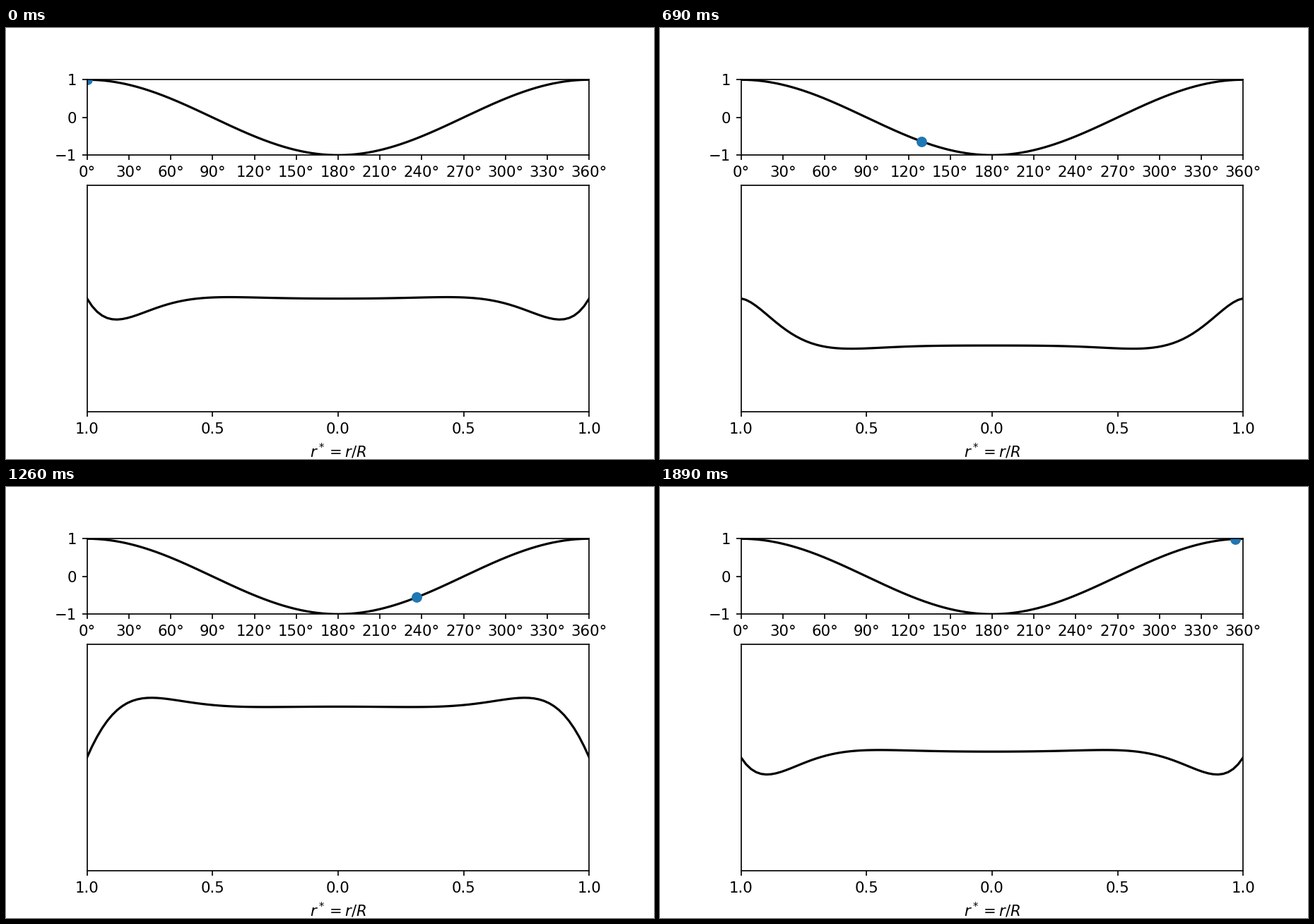
These frames come from a looping animation (917x611 px, 1.92 s). A matplotlib script:

```python
import numpy as np
import matplotlib.pyplot as plt
from matplotlib.animation import FuncAnimation

FRAMES = 64
INTERVAL = 30
ALPHA = 10      # Womersley number
LIMIT = 1.843   # half height of the velocity axis


def bessel_j0(s, terms=60):
    """J0(i^(3/2) s) by its power series."""
    s = np.asarray(s, dtype=float)
    term = np.ones(s.shape, dtype=complex)
    total = term.copy()
    for k in range(1, terms):
        term = term * (0.25j * s**2) / k**2
        total = total + term
    return total


r = np.linspace(-1, 1, 101)
profile = 1j * (1 - bessel_j0(ALPHA * r) / bessel_j0(ALPHA))
phases = 360 * np.arange(FRAMES) / FRAMES

plt.rcParams["font.family"] = "DejaVu Sans"
fig, (top, flow) = plt.subplots(
    2, 1, figsize=(6.0033, 4), dpi=152.75,
    gridspec_kw={"height_ratios": [1, 3]})

angle = np.linspace(0, 360, 361)
top.plot(angle, np.cos(np.radians(angle)), color="black")
dot, = top.plot([], [], "o", color="tab:blue")
degrees = range(0, 361, 30)
top.set_xlim(0, 360)
top.set_ylim(-1, 1)
top.set_xticks(degrees, [f"{d}°" for d in degrees])
top.set_yticks([-1, 0, 1])

curve, = flow.plot([], [], color="black")
ticks = np.linspace(-1, 1, 5)
flow.set_xlim(-1, 1)
flow.set_ylim(-LIMIT, LIMIT)
flow.set_xticks(ticks, [f"{abs(t):.1f}" for t in ticks])
flow.set_yticks([])
flow.set_xlabel("$r^* = r/R$")


def update(i):
    phase = np.radians(phases[i])
    dot.set_data([phases[i]], [np.cos(phase)])
    curve.set_data(r, (profile * np.exp(1j * phase)).real)
    return dot, curve


anim = FuncAnimation(fig, update, frames=FRAMES, interval=INTERVAL,
                     repeat=True, repeat_delay=0)
plt.show()
```
